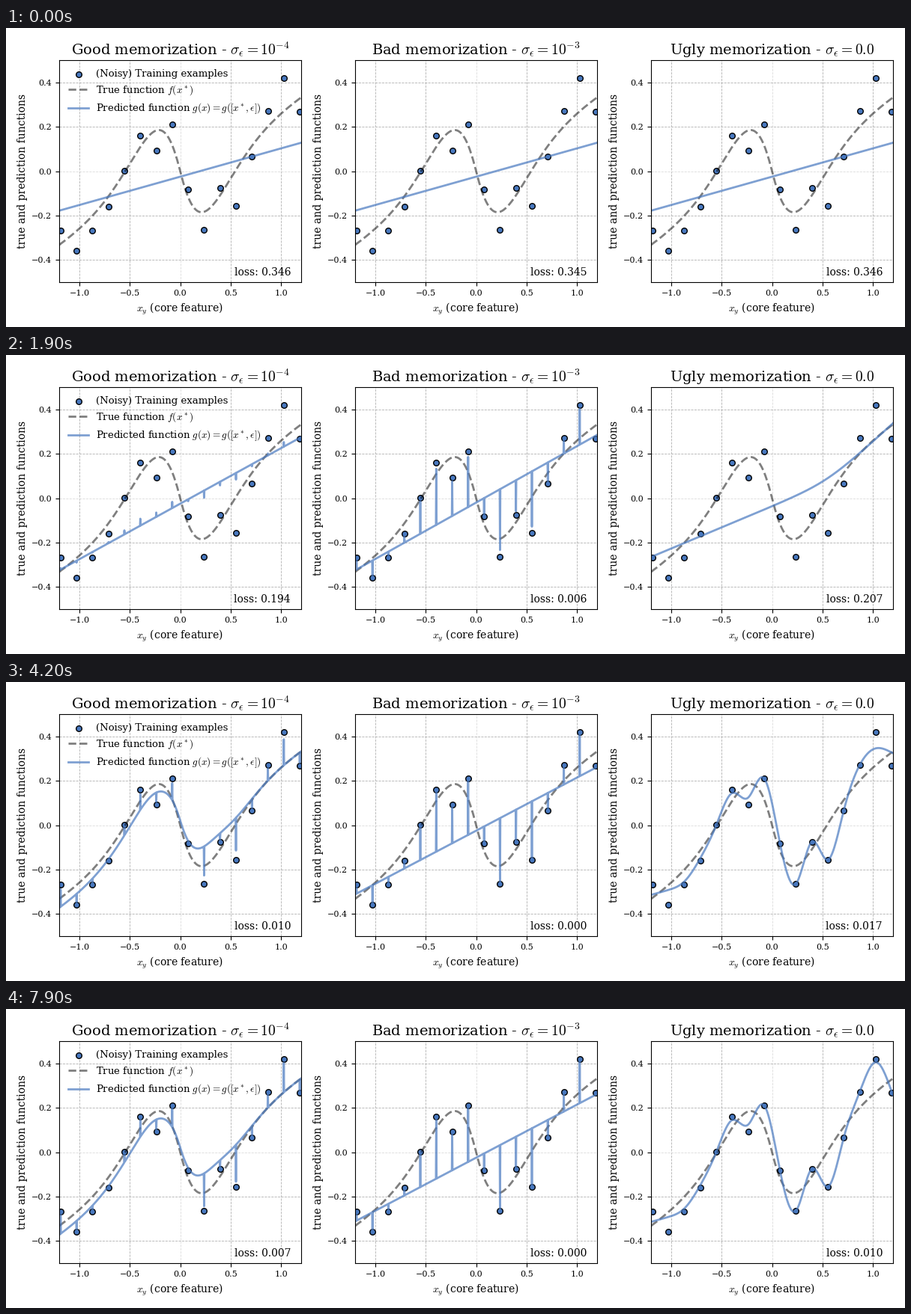
Write a matplotlib script that moves like this. It is 1200x400 px and loops after 8000 ms.

```python
import matplotlib.pyplot as plt
import numpy as np
from matplotlib.animation import FuncAnimation

W, H, DPI = 1200, 400, 100
LOOP, STEP = 8000, 50
LEFT, BOTTOM, AX_W, AX_H, PITCH = 71, 60, 323, 297, 395
BLUE = "#4878bf"
NOTCH = 0.003  # half width of a memorization spike

plt.rcParams.update({
    "font.family": "DejaVu Serif",
    "mathtext.fontset": "cm",
    "axes.labelsize": 10,
    "axes.titlesize": 14,
    "xtick.labelsize": 8,
    "ytick.labelsize": 8,
})


def spline(kx, ky, x):
    """Natural cubic spline through the knots, evaluated at x."""
    n, h = len(kx), np.diff(kx)
    slope = np.diff(ky) / h
    a, rhs = np.eye(n), np.zeros(n)
    for i in range(1, n - 1):
        a[i, i - 1:i + 2] = h[i - 1], 2 * (h[i - 1] + h[i]), h[i]
        rhs[i] = 6 * (slope[i] - slope[i - 1])
    m = np.linalg.solve(a, rhs)
    i = np.clip(np.searchsorted(kx, x) - 1, 0, n - 2)
    d = x - kx[i]
    lin = slope[i] - h[i] * (2 * m[i] + m[i + 1]) / 6
    return ky[i] + lin * d + m[i] * d**2 / 2 + (m[i + 1] - m[i]) / (6 * h[i]) * d**3


def truth(x):
    return x * (.285 - 2.07 * np.exp(-(np.abs(x) / .322) ** 1.3))


# Training points
px = np.linspace(-1.186, 1.186, 16)
py = np.array([-.267, -.358, -.267, -.16, .002, .16, .093, .211,
               -.082, -.264, -.075, -.156, .066, .271, .42, .268])

xs = np.linspace(-1.2, 1.2, 401)
grid = np.unique(np.concatenate([xs, px - NOTCH, px, px + NOTCH]))
tents = np.clip(1 - np.abs(grid[:, None] - px) / NOTCH, 0, 1)


def line(a, b):
    return a + b * grid


def bump(center, width):
    return np.exp(-((grid - center) / width) ** 2)


def partly_learned(amount, bias):
    """Blend of a line and the true function, flattened right of zero."""
    left_side = 1 / (1 + np.exp((grid + .1) / .05))
    skew = .09 * bump(.28, .25) - .04 * left_side
    return (1 - amount) * line(-.025, .25) + amount * (truth(grid) + bias * skew)


def memorized(peak, end):
    """Smooth curve drawn towards the points; peak and end pull at the right."""
    pull = np.interp(px, [-1, -.87, -.2, -.08, .87, 1.03, 1.186],
                     [.25, .8, .65, 1, 1, peak, end])
    base = truth(px)
    return spline(px, base + pull * (py - base), grid)


start, fit = line(-.025, .1275), line(0, .2475)
flat = line(-.025, .239)
bend = line(-.037, .19) + .225 * .14 * np.logaddexp(0, (grid - .55) / .14)
swing = (truth(grid) - .03 * bump(-.5, .25)
         - .145 * bump(.57, .15) + .105 * bump(.92, .17))
settled = partly_learned(1, 1)

# Per panel: title, curves, memorized share of the residuals, losses at each time
times = [0, 450, 1900, 3300, 4200, 5900, 7900]
panels = [
    (r"Good memorization - $\sigma_\epsilon = 10^{-4}$",
     [start, fit, partly_learned(0, 0), partly_learned(.72, .3)] + [settled] * 3,
     [0, 0, .11, .42, .78, .86, .88],
     [.346, .237, .194, .057, .010, .005, .007]),
    (r"Bad memorization - $\sigma_\epsilon = 10^{-3}$",
     [start, fit, line(-.02, .254)] + [flat] * 4,
     [0, .09, .9, .98, 1, 1, 1],
     [.345, .213, .006, .002, .0004, .0001, .0001]),
    (r"Ugly memorization - $\sigma_\epsilon = 0.0$",
     [start, fit, bend, swing, memorized(.5, 0), memorized(.4, 1), memorized(.9, .9)],
     [0] * 7,
     [.346, .238, .207, .042, .017, .021, .010]),
]

fig = plt.figure(figsize=(W / DPI, H / DPI), dpi=DPI, facecolor="white")
XTICKS = [-1, -.5, 0, .5, 1]
YTICKS = [-.4, -.2, 0, .2, .4]
DOTS = dict(s=30, color=BLUE, edgecolor="black", lw=1)
DASHED = dict(color="black", alpha=.5, lw=2, ls="--")
SOLID = dict(color=BLUE, alpha=.7, lw=2)


def rule(draw, v):
    shade = "#dadada" if v == 0 else "#b0b0b0"
    draw(v, color=shade, lw=.6, ls="--", zorder=0)


def make_panel(left, title):
    ax = fig.add_axes([left / W, BOTTOM / H, AX_W / W, AX_H / H])
    ax.set(xlim=(-1.2, 1.2), ylim=(-.5, .5), xticks=XTICKS, yticks=YTICKS,
           xlabel="$x_y$ (core feature)", ylabel="true and prediction functions")
    ax.set_title(title)
    for v in XTICKS:
        rule(ax.axvline, v)
    for v in YTICKS:
        rule(ax.axhline, v)
    ax.scatter(px, py, **DOTS)
    ax.plot(xs, truth(xs), **DASHED)
    curve, = ax.plot([], [], **SOLID)
    loss = ax.text(.957, 9 / AX_H, "", transform=ax.transAxes, ha="right",
                   va="baseline", fontsize=10)
    return ax, curve, loss


def add_legend(ax):
    """Key in the upper left, placed in stage pixels."""
    def at(x, y):
        return (x - LEFT) / AX_W, (H - BOTTOM - y) / AX_H

    def handle(y, style):
        ax.plot(*zip(at(83, y), at(109.5, y)), transform=ax.transAxes, **style)

    ax.scatter(*at(96.5, 61.5), transform=ax.transAxes, **DOTS)
    handle(82, DASHED)
    handle(106.5, SOLID)
    rows = [
        (64.5, "(Noisy) Training examples"),
        (86.5, "True function $f(x^*)$"),
        (111, r"Predicted function $g(x)=g([x^*,\epsilon])$"),
    ]
    for y, label in rows:
        ax.text(*at(120, y), label, transform=ax.transAxes, fontsize=9.5, va="baseline")


views = [make_panel(LEFT + PITCH * i, p[0]) for i, p in enumerate(panels)]
add_legend(views[0][0])


def update(frame):
    t = min(frame * STEP, times[-1])
    if t >= 900:  # later training is shown in coarser steps
        t -= t % 100
    k = min(np.searchsorted(times, t, side="right") - 1, len(times) - 2)
    u = (t - times[k]) / (times[k + 1] - times[k])
    if k == 0:
        u = 1 - (1 - u) ** 2

    def mix(keys):
        return keys[k] * (1 - u) + keys[k + 1] * u

    for (_, curves, shares, losses), (_, curve, loss) in zip(panels, views):
        y = mix(curves)
        spikes = mix(shares) * (py - np.interp(px, grid, y))
        curve.set_data(grid, y + tents @ spikes)
        loss.set_text(f"loss: {np.exp(mix(np.log(losses))):.3f}")
    return [a for v in views for a in v[1:]]


anim = FuncAnimation(fig, update, frames=LOOP // STEP, interval=STEP,
                     repeat=True, repeat_delay=0)
plt.show()
```
